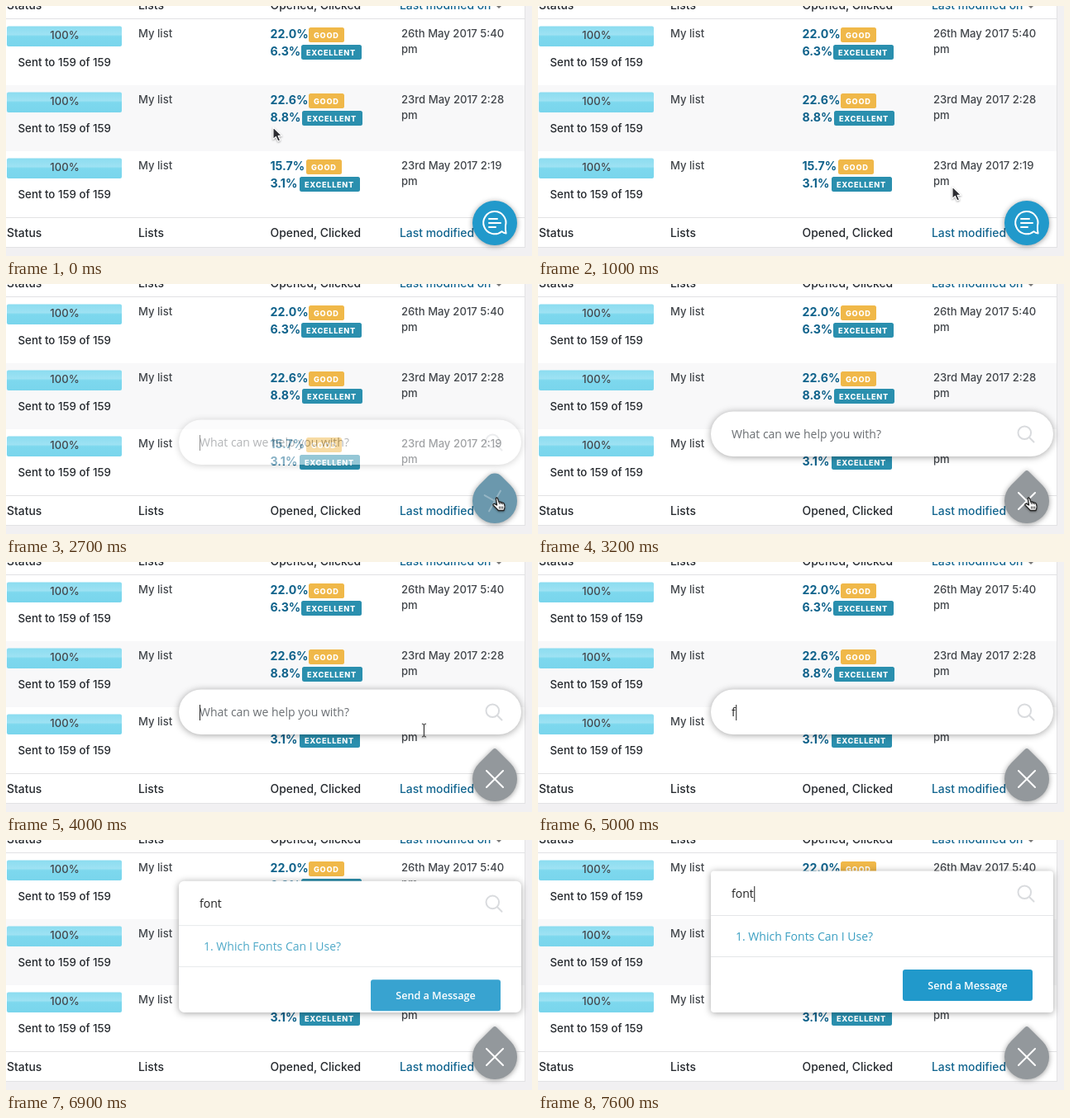
An HTML page for the animation above (8000 ms loop, 636 by 303 pixels).

```html
<!DOCTYPE html>
<html lang="en">
<head>
<meta charset="utf-8">
<title>Help widget search</title>
<style>
  html, body { margin: 0; width: 100%; height: 100%; overflow: hidden; background: #f1f0f2; }
  svg { display: block; width: 636px; height: 303px; }
  text { font-family: Inter, Roboto, sans-serif; font-size: 13.1px; font-weight: 450; fill: #42464b; white-space: pre; }
  .head { font-size: 13.9px; fill: #25292e; }
  .link { fill: #12658f; }
  .sent { font-size: 13.3px; fill: #25292e; }
  .rate { font-size: 14.2px; font-weight: 650; fill: #0f628b; }
  .tag { font-size: 9.2px; font-weight: 800; letter-spacing: .7px; fill: #fff; }
  .pop text { font-family: "Open Sans", "Noto Sans", sans-serif; font-size: 14px; font-weight: 400; }
  .pop .send { font-size: 12.6px; font-weight: 600; fill: #fff; }
  .line { fill: none; stroke: #fff; stroke-width: 2; stroke-linecap: round; }
  #popup { filter: drop-shadow(0 1px 4px rgba(0, 0, 0, .36)); }
  #beacon { filter: drop-shadow(0 1px 3px rgba(0, 0, 0, .4)); }
  #pointer { filter: drop-shadow(0 1px 1px rgba(0, 0, 0, .35)); }
</style>
</head>
<body>
<svg viewBox="0 0 636 303">
  <defs>
    <linearGradient id="bar" x1="0" y1="0" x2="0" y2="1">
      <stop offset="0" stop-color="#8bdcf0"/>
      <stop offset=".42" stop-color="#9ee2f3"/>
      <stop offset=".5" stop-color="#7dd8ee"/>
      <stop offset="1" stop-color="#79d5ec"/>
    </linearGradient>
    <clipPath id="clip"><rect class="frame" x="209" width="414"/></clipPath>
  </defs>

  <rect x="-1" y="-1" width="628.5" height="293.5" fill="#fff" stroke="#e2e2e4"/>
  <g id="table"></g>

  <g id="popup" class="pop">
    <rect class="frame" x="209" width="414" fill="#fff"/>
    <g clip-path="url(#clip)">
      <g id="content">
        <g id="results">
          <path d="M209 54H623M209 104H623" stroke="#e4e6e8"/>
          <text x="239" y="84.5" style="fill:#3b9fc2">1. Which Fonts Can I Use?</text>
          <rect x="441" y="119.5" width="157" height="38" rx="3" fill="#2199cb"/>
          <text class="send" x="519.5" y="143.5" text-anchor="middle">Send a Message</text>
        </g>
        <text id="hint" x="234" y="32.5" style="fill:#6b6f73">What can we help you with?</text>
        <text id="query" x="234" y="32.5" style="fill:#222"></text>
        <path id="caret" d="M0 18.5V37.5" stroke="#222"/>
        <circle id="dot" cx="563" cy="26.5" r="8" fill="#7fcfe4"/>
        <g fill="none" stroke="#d9dbde" stroke-width="2" stroke-linecap="round">
          <circle cx="588.3" cy="25.7" r="7.8"/>
          <path d="M594 31.5L599.5 37"/>
        </g>
      </g>
    </g>
  </g>

  <g id="beacon" transform="translate(591 263)">
    <path id="drop" transform="rotate(45)"/>
    <g id="chat" class="line">
      <path d="M8.5 10.2A13.6 13.6 0 1 1 13 3.2Q12.7 8 13.6 12.6Q10.8 12.2 8.5 10.2Z" stroke-linejoin="round"/>
      <path d="M-7 -5H3M-7 0H7M-7 5H1"/>
    </g>
    <path id="cross" class="line" d="M-10 -10L10 10M10 -10L-10 10"/>
  </g>

  <g id="pointer">
    <path id="arrow" d="M0 0V14.5L3.4 11.4L5.9 17L8.6 15.8L6.1 10.4H10.6Z" fill="#2b2b30" stroke="#fff" stroke-width="1.1" stroke-linejoin="round"/>
    <g id="hand" stroke="#222" stroke-width="1.3" stroke-linejoin="round">
      <path d="M-1.6 1Q-1.2 -.8 .3 .6L2 5.4Q3 4.4 4 5.6Q5.2 4.8 6 6.2Q7.6 5.6 8.4 7.4Q9.6 10.6 8.8 13L8 15.5H1.4Q-2 12 -5 9Q-5.4 7 -3.4 7.4L-.4 9Z" fill="#fff"/>
      <path d="M2 5.4L2.8 8M4 5.6L4.8 8M6 6.2L6.6 8.4M2.6 10.5V13.5M4.6 10.5V13.5M6.6 10.5V13.5" stroke-width=".9"/>
    </g>
    <path id="beam" d="M-2.5 -8Q0 -8 0 -6V6Q0 8 -2.5 8M2.5 -8Q0 -8 0 -6M0 6Q0 8 2.5 8" fill="none" stroke="#333"/>
  </g>
</svg>
<script>
const LOOP = 8000, STEP = 100;
const $ = id => document.getElementById(id);
const clamp = x => Math.max(0, Math.min(1, x));
const mix = (a, b, p) => a + (b - a) * p;
const ease = p => p * p * (3 - 2 * p);
const span = (t, a, b) => ease(clamp((t - a) / (b - a)));
const show = (id, on) => $(id).setAttribute('opacity', +on);
const label = (x, y, text, cls = '', more = '') =>
  `<text x="${x}" y="${y}" class="${cls}" ${more}>${text}</text>`;
const badge = (x, y, w, color, text) =>
  `<rect x="${x}" y="${y}" width="${w}" height="18" rx="2.5" fill="${color}"/>` +
  label(x + 6, y + 12.6, text, 'tag');

const ROWS = [
  { opened: '22.0%', clicked: '6.3%', good: 366, best: 357, date: '26th May 2017 5:40' },
  { opened: '22.6%', clicked: '8.8%', good: 366, best: 358, date: '23rd May 2017 2:28' },
  { opened: '15.7%', clicked: '3.1%', good: 363, best: 355, date: '23rd May 2017 2:19' }
];

function titles(y) {
  return label(1, y, 'Status', 'head') + label(160, y, 'Lists', 'head') +
    label(319.5, y, 'Opened, Clicked', 'head') + label(476, y, 'Last modified on', 'head link');
}

function row(r, i) {
  const fill = i % 2 ? '#f8f8f9' : '#fff';
  return `<g transform="translate(0 ${16 + 80 * i})">
    <rect width="627" height="80" fill="${fill}"/>
    <rect x="1" y="8.5" width="139" height="24.5" rx="2" fill="url(#bar)"/>` +
    label(71, 24.3, '100%', '', 'text-anchor="middle"') +
    label(14.5, 57, 'Sent to 159 of 159', 'sent') +
    label(160, 22, 'My list') +
    label(319.5, 23, r.opened, 'rate') + badge(r.good, 10, 43, '#f0b849', 'GOOD') +
    label(319.5, 44, r.clicked, 'rate') + badge(r.best, 31, 73, '#2a8fae', 'EXCELLENT') +
    label(478, 22, r.date) + label(478, 41, 'pm') + '</g>';
}

$('table').innerHTML = titles(3.5) + ROWS.map(row).join('') + titles(279.5) +
  '<path d="M0 15.5H627M0 256.5H627" stroke="#e2e2e4"/><path d="M592 -1H600L596 3Z" fill="#777"/>';

// time, x, y
const PATH = [
  [400, 323, 147], [1000, 501, 219], [1300, 550, 246], [1600, 579, 257],
  [1900, 594, 259], [3500, 594, 259], [4200, 470, 182]
];

function pointerAt(t) {
  const n = PATH.findIndex(k => k[0] > t);
  if (n === 0) return PATH[0].slice(1);
  if (n < 0) return PATH[PATH.length - 1].slice(1);
  const a = PATH[n - 1], b = PATH[n], p = (t - a[0]) / (b[0] - a[0]);
  return [mix(a[1], b[1], p), mix(a[2], b[2], p)];
}

function drawPointer(t) {
  const [x, y] = pointerAt(t);
  const onButton = Math.hypot(x - 591, y - 263) < 28;
  const inField = t > 3500 && y < 209;
  $('pointer').setAttribute('transform', `translate(${x} ${y})`);
  show('pointer', t < 5000);
  show('hand', onButton);
  show('beam', inField);
  show('arrow', !onButton && !inField);
}

const BLUE = [33, 153, 203], GRAY = [147, 152, 156];

// A circle whose one corner sharpens into the tip of a drop
function drawBeacon(t) {
  const p = span(t, 2400, 2900), r = 27, q = mix(r, 3, p);
  const arc = `A${r} ${r} 0 0 1 `;
  $('drop').setAttribute('d',
    `M-${r} 0V${q - r}A${q} ${q} 0 0 1 ${q - r} -${r}H0${arc}${r} 0${arc}0 ${r}${arc}-${r} 0Z`);
  $('drop').setAttribute('fill', `rgb(${BLUE.map((c, i) => mix(c, GRAY[i], p))})`);
  $('chat').setAttribute('opacity', clamp(1 - 2 * p));
  $('cross').setAttribute('opacity', clamp(2 * p - 1));
  $('cross').setAttribute('transform', `rotate(${mix(-45, 0, p)})`);
}

function caretOn(t) {
  if (t < 5000) return t >= 2700 && (t < 3200 || (t >= 3700 && t < 4200) || t >= 4700);
  if (t < 6400) return t < 5500 || t >= 6000;
  return t >= 7000 && !(t >= 7500 && t < 7600);
}

function drawPopup(t) {
  const open = span(t, 2400, 3000), grow = span(t, 6500, 7000);
  const top = mix(154.5, 37.5, grow);
  for (const f of document.querySelectorAll('.frame')) {
    f.setAttribute('y', top);
    f.setAttribute('height', 209 - top);
    f.setAttribute('rx', mix(27.2, 4, grow));
  }
  $('popup').setAttribute('opacity', open);
  $('popup').setAttribute('transform', `translate(0 ${mix(20, 0, open)})`);
  $('content').setAttribute('transform', `translate(0 ${top})`);
  $('results').setAttribute('opacity', grow);

  const typed = t < 5000 ? 0 : Math.min(4, Math.floor((t - 5000) / 100) + 1);
  const query = $('query');
  query.textContent = 'font'.slice(0, typed);
  show('hint', !typed);
  const x = 234.5 + (typed ? query.getComputedTextLength() + .5 : 0);
  $('caret').setAttribute('transform', `translate(${x} 0)`);
  show('caret', caretOn(t));
  show('dot', t >= 6400 && t < 6600);
}

function draw(time) {
  const t = Math.floor(time % LOOP / STEP) * STEP;
  drawPointer(t);
  drawBeacon(t);
  drawPopup(t);
}

const start = performance.now();
function tick() {
  draw(performance.now() - start);
  requestAnimationFrame(tick);
}
tick();
</script>
</body>
</html>
```
